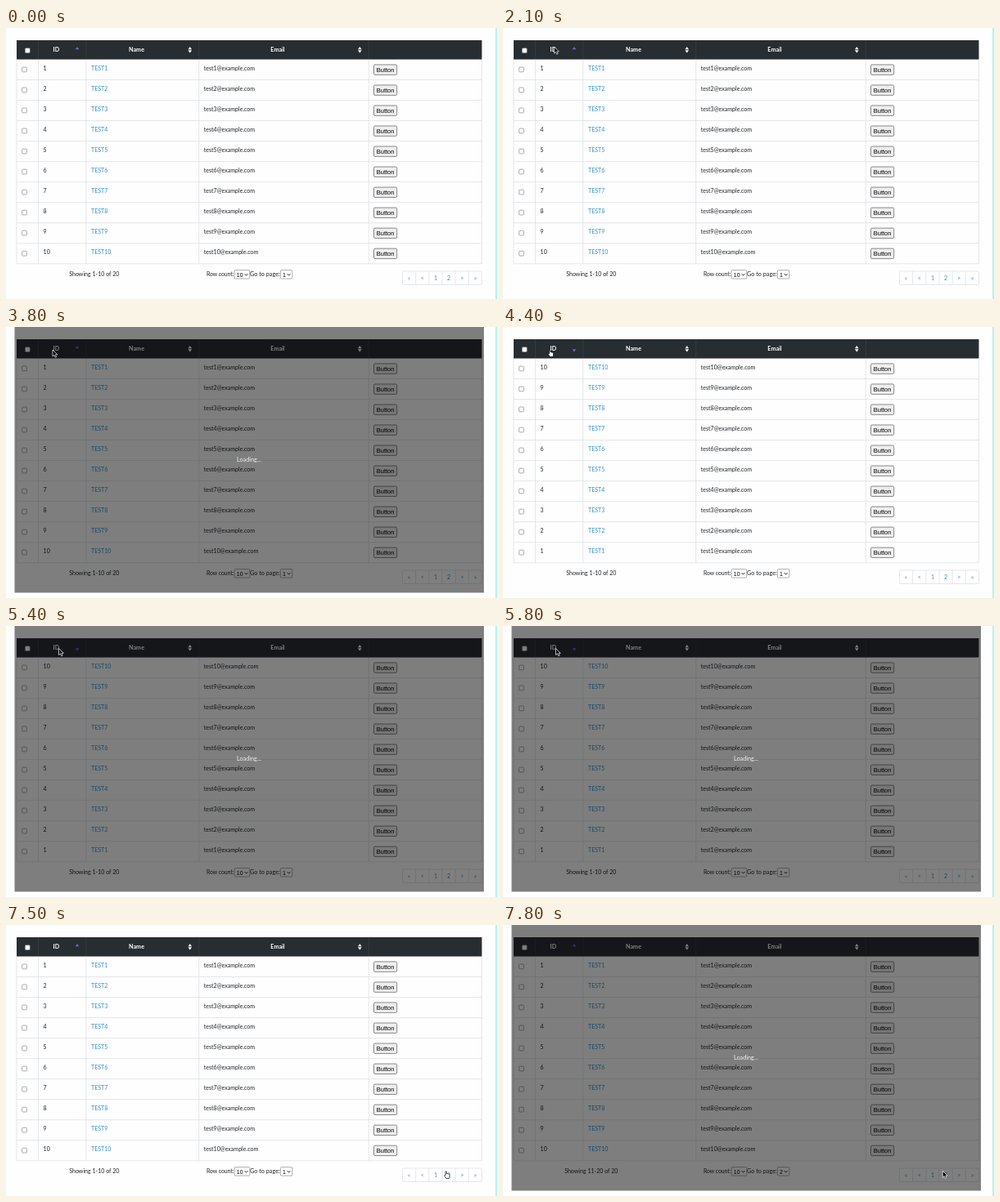
These frames come from a looping animation (600x332 px, 8 s). An HTML page:

```html
<!DOCTYPE html>
<html lang="en">
<head>
<meta charset="utf-8">
<title>Sortable table</title>
<style>
  html, body { margin: 0; width: 100%; height: 100%; overflow: hidden; background: #fefefe; }
  svg { display: block; width: 100%; height: 100%; }
  text { font: 7.05px Lato, "Open Sans", sans-serif; fill: #212529; white-space: pre; }
  .head { font-weight: 700; font-size: 7.2px; fill: #fff; }
  .mid { text-anchor: middle; }
  .link { fill: #2f8fcb; }
  .off { fill: #75899b; }
  .ui { font: 7.5px "Liberation Sans", Arial, sans-serif; fill: #000; }
</style>
</head>
<body>
<svg id="stage" viewBox="0 0 600 332"></svg>
<script>
const LOOP = 8000, ROWS = 10, PITCH = 25.03;
const stage = document.getElementById('stage');

function add(tag, attrs, parent = stage) {
  const el = document.createElementNS('http://www.w3.org/2000/svg', tag);
  for (const key in attrs) el.setAttribute(key, attrs[key]);
  parent.appendChild(el);
  return el;
}
function label(x, y, content, cls = '', size) {
  const el = add('text', { x, y, class: cls });
  el.textContent = content;
  if (size) el.style.fontSize = size + 'px';
  return el;
}
function box(x, y, width, height, fill, stroke = 'none', rx = 0, weight = 0.6) {
  return add('rect', { x, y, width, height, fill, stroke, rx, 'stroke-width': weight });
}
function line(x1, y1, x2, y2, stroke) {
  add('line', { x1, y1, x2, y2, stroke, 'stroke-width': 0.7 });
}
function shape(d, fill) {
  return add('path', { d, fill });
}
const upArrow = (x, fill) => shape(`M${x - 2.3} 26.2h4.6l-2.3-3.2z`, fill);
const downArrow = (x, fill) => shape(`M${x - 2.3} 27.3h4.6l-2.3 3.2z`, fill);

function select(x, width, value) {
  box(x, 296.7, width, 10.4, '#fff', '#767676', 1);
  const text = label(x + 2.6, 304.8, value, 'ui', 7);
  add('path', { d: `M${x + width - 6} 301.2l1.8 2l1.8-2`, fill: 'none', stroke: '#111', 'stroke-width': 0.9 });
  return text;
}

// Page and table grid
box(0, 0, 600, 332, '#fefefe');
box(598, 0, 2, 332, '#b4f3f5');
box(13, 15, 568.5, 23.5, '#282d32');
const columns = [39.5, 97.8, 235.8, 443.3];
for (const x of columns) line(x, 15, x, 38.5, '#3b4147');
for (const x of [13, ...columns, 581.5]) line(x, 38.5, x, 288.8, '#dadde1');
for (let i = 1; i <= ROWS; i++) line(13, 38.5 + i * PITCH, 581.5, 38.5 + i * PITCH, '#dadde1');

// Header
box(23.4, 24.7, 5.8, 5.8, '#fff', '#8a8a8a', 1);
[['ID', 61.4], ['Name', 159.5], ['Email', 332]].forEach(([name, x]) => label(x, 28.7, name, 'head mid'));
for (const x of [224.8, 432.3]) { upArrow(x, '#fff'); downArrow(x, '#fff'); }
const ascending = upArrow(87, '#656bd0'), descending = downArrow(87, '#656bd0');

// Body rows
const rows = Array.from({ length: ROWS }, (_, i) => {
  const y = 51.6 + i * PITCH;
  box(19.6, y - 3.6, 5.8, 5.8, '#fff', '#767676', 1.1);
  box(449.5, y - 6.7, 28.2, 12.4, '#efefef', '#6c6c6c', 1.5, 0.8);
  label(463.6, y + 2, 'Button', 'ui mid');
  return [label(45.6, y, ''), label(104, y, '', 'link'), label(241.8, y, '')];
});

// Footer
const showing = label(107.8, 303.9, '', 'mid');
label(245, 303.9, 'Row count:', '', 6.8);
select(279.2, 18.6, '10');
label(298, 303.9, 'Go to page:', '', 7.25);
const pageValue = select(335.4, 14.4, '1');
box(484.5, 298, 97, 16.4, '#fff', '#dadde1', 1.5, 0.7);
const pager = ['«', '<', '1', '2', '>', '»'].map((mark, i) => {
  const x = 484.5 + i * 16.17;
  if (i) line(x, 298, x, 314.4, '#dadde1');
  return label(x + 8.1, 308.7, mark, 'mid link');
});

// Loading cover
const cover = add('g', {});
add('rect', { x: 10.5, y: 0, width: 573.5, height: 325.5, fill: '#000', 'fill-opacity': 0.5 }, cover);
const loading = add('text', { x: 297, y: 164.7, class: 'mid', style: 'fill:#f2f2f2;font-size:7.3px' }, cover);
loading.textContent = 'Loading...';

// Pointers, with the hot spot near the top left corner
const pointers = {
  arrow: add('path', {
    d: 'M0 0V8L1.9 6.3L3.2 9.2L4.6 8.6L3.4 5.8H5.8Z',
    fill: '#000', stroke: '#fff', 'stroke-width': 0.7, 'stroke-linejoin': 'round'
  }),
  hand: add('path', {
    d: 'M2 5.6V1.1Q2.7 .2 3.4 1.1V3.8Q4.2 3.2 4.8 4Q5.5 3.5 6 4.3Q7 4 7.1 5V7Q7 8.2 6.3 9.5H2.8Q2 7.7 .6 6.2Q.7 5 2 5.6Z',
    fill: '#fff', stroke: '#000', 'stroke-width': 0.7, 'stroke-linejoin': 'round'
  })
};

// start, steps of 100 ms, from x, y, to x, y, pointer
const moves = [
  [0, 1, 0, 0, 0, 0, ''],
  [100, 3, 171, 290, 93, 76, 'arrow'],
  [500, 3, 62, 56, 114, 143, 'arrow'],
  [900, 1, 0, 0, 0, 0, ''],
  [1500, 7, 62, 55, 62.5, 23, 'arrow'],
  [2600, 1, 62, 23, 62, 23, 'hand'],
  [3100, 2, 58, 25, 54.5, 27, 'hand'],
  [3800, 1, 57, 28, 57, 28, 'arrow'],
  [4400, 5, 54.5, 27, 62, 27, 'hand'],
  [5400, 1, 64.5, 27.5, 64.5, 27.5, 'arrow'],
  [6100, 4, 65, 30, 93, 97, 'arrow'],
  [6600, 4, 190, 142, 553, 294, 'arrow'],
  [7000, 1, 536, 290, 536, 290, 'arrow'],
  [7200, 4, 535, 290, 535, 301, 'hand'],
  [7700, 1, 537.3, 301.3, 537.3, 301.3, 'arrow']
];

const within = (t, from, to) => t >= from && t < to;
const show = (el, on) => el.setAttribute('visibility', on ? 'visible' : 'hidden');

function drawPointer(t) {
  const [start, steps, x0, y0, x1, y1, kind] = moves.filter(m => m[0] <= t).pop();
  const step = Math.min(Math.floor((t - start) / 100), steps - 1);
  const k = steps > 1 ? step / (steps - 1) : 0;
  for (const name in pointers) show(pointers[name], name === kind);
  if (kind) pointers[kind].setAttribute('transform', `translate(${x0 + (x1 - x0) * k} ${y0 + (y1 - y0) * k})`);
}

let lastState = '';
function drawTable(reversed, page) {
  const state = reversed + '/' + page;
  if (state === lastState) return;
  lastState = state;
  rows.forEach(([id, name, mail], i) => {
    const n = reversed ? ROWS - i : i + 1;
    id.textContent = n;
    name.textContent = 'TEST' + n;
    mail.textContent = `test${n}@example.com`;
  });
  show(ascending, !reversed);
  show(descending, reversed);
  showing.textContent = page === 1 ? 'Showing 1-10 of 20' : 'Showing 11-20 of 20';
  pageValue.textContent = page;
  pager.forEach((el, i) => {
    const off = page === 1 ? i < 3 : i > 2;
    el.setAttribute('class', 'mid ' + (off ? 'off' : 'link'));
  });
}

function render(t) {
  drawTable(within(t, 4400, 6100), t >= 7700 ? 2 : 1);
  cover.style.display = within(t, 3800, 4400) || within(t, 5400, 6100) || t >= 7700 ? '' : 'none';
  drawPointer(t);
}

const began = performance.now();
function tick() {
  render((performance.now() - began) % LOOP);
  requestAnimationFrame(tick);
}
tick();
</script>
</body>
</html>
```
